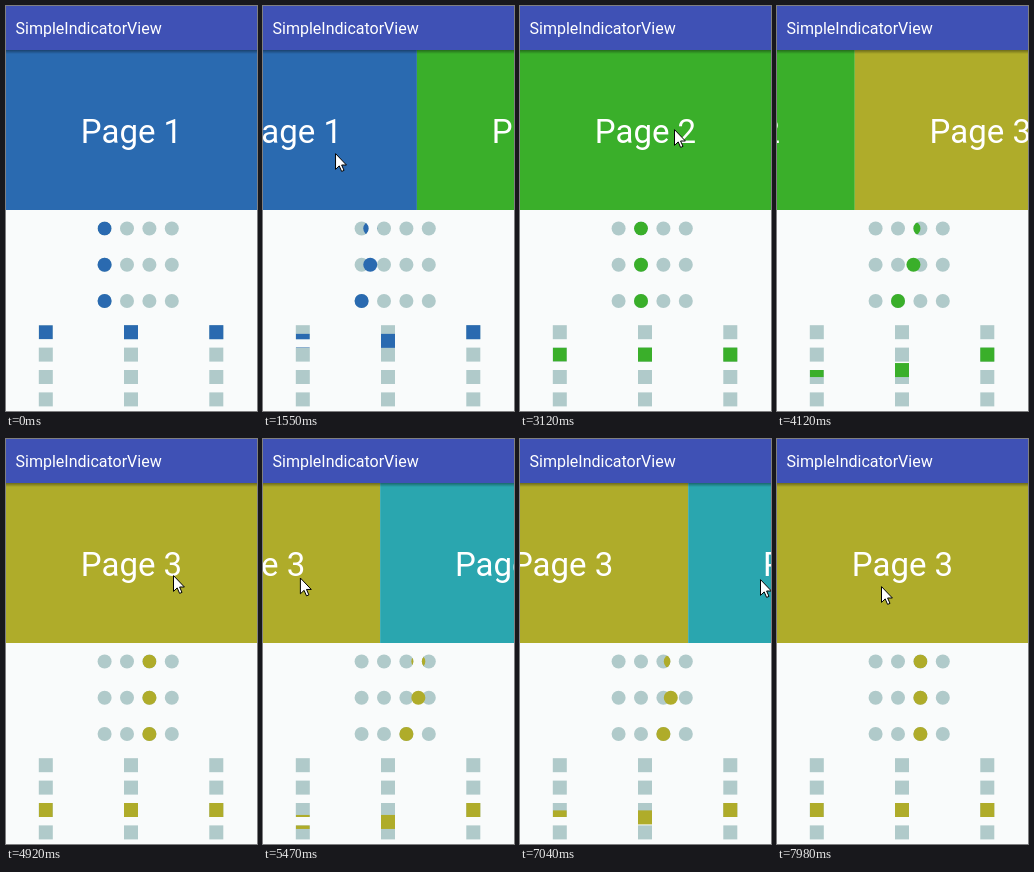
These frames come from a looping animation (251x405 px, 8 s). An HTML page:

```html
<!DOCTYPE html>
<html lang="en">
<head>
<meta charset="utf-8">
<title>Pager indicators</title>
<style>
  html, body { margin: 0; width: 100%; height: 100%; overflow: hidden; background: #f9fbfb; }
  svg { display: block; width: 100vw; height: 100vh; }
  text { font-family: Roboto, "Noto Sans", sans-serif; fill: #fff; }
  .title { font-size: 16px; }
  .page { font-size: 33px; text-anchor: middle; }
  .idle { fill: #b0caca; }
</style>
</head>
<body>
<svg viewBox="0 0 251 405">
  <defs>
    <linearGradient id="shade" x2="0" y2="1">
      <stop offset="0" stop-color="#000" stop-opacity=".38"/>
      <stop offset="1" stop-color="#000" stop-opacity="0"/>
    </linearGradient>
    <clipPath id="dotClip"></clipPath>
    <clipPath id="boxClip"></clipPath>
  </defs>
  <rect width="251" height="405" fill="#f9fbfb"/>
  <g id="pages"></g>
  <rect y="44" width="251" height="4" fill="url(#shade)"/>
  <rect width="251" height="44" fill="#3f51b5"/>
  <text class="title" x="9.5" y="27.5">SimpleIndicatorView</text>
  <g id="idle" class="idle"></g>
  <g id="active"></g>
  <path id="cursor" d="M.5 .6V16.4L4.2 12.9 6.6 18.4 9 17.4 6.6 12H11.4Z"
        fill="#fff" stroke="#000" stroke-width="1"/>
</svg>
<script>
const LOOP = 8000, FIRST = 370, TICK = 78.45;
const WIDTH = 251, GAP = 22.4, COUNT = 4;
const COLORS = ['#2a6ab0', '#3aaf2a', '#afac2a', '#2aa6af'];
const ROWS = [222.5, 258.7, 295];
const COLUMNS = [32.8, 118, 203.3];

const byId = id => document.getElementById(id);

function add(parent, tag, attrs) {
  const el = document.createElementNS('http://www.w3.org/2000/svg', tag);
  for (const key in attrs) el.setAttribute(key, attrs[key]);
  return parent.appendChild(el);
}
const addDot = (parent, cy, i = 0) =>
  add(parent, 'circle', { cx: 98.6 + GAP * i, cy, r: 7 });
const addBox = (parent, x, i = 0) =>
  add(parent, 'rect', { x, y: 319.2 + GAP * i, width: 14, height: 14 });

COLORS.forEach((fill, i) => {
  add(byId('pages'), 'rect', { x: WIDTH * i, y: 44, width: WIDTH, height: 160, fill });
  add(byId('pages'), 'text', { class: 'page', x: WIDTH * (i + .5), y: 136.5 })
    .textContent = 'Page ' + (i + 1);
});
for (let i = 0; i < COUNT; i++) {
  ROWS.forEach(y => addDot(byId('idle'), y, i));
  COLUMNS.forEach(x => addBox(byId('idle'), x, i));
  addDot(byId('dotClip'), ROWS[0], i);
  addBox(byId('boxClip'), COLUMNS[0], i);
}

// The first indicator of each kind shows only inside the idle marks.
function addActive(draw, places, clip) {
  return places.map((place, i) => {
    const holder = add(byId('active'), 'g', i ? {} : { 'clip-path': `url(#${clip})` });
    return draw(holder, place);
  });
}
const dots = addActive(addDot, ROWS, 'dotClip');
const boxes = addActive(addBox, COLUMNS, 'boxClip');

const smooth = x => x * x * (3 - 2 * x);
const settle = x => 1 - (1 - x) ** 4;

// Moves: start tick, end tick, target values, easing
const SCROLL = [
  [11, 18.6, [.717]], [26, 30, [1], settle],
  [41, 46, [1.69]], [47, 48, [1.673]], [48, 52, [2], settle],
  [63, 66, [2.72]], [68, 72, [3], settle],
  [81, 85, [2.33]], [87, 91, [2], settle]
];
const POINTER = [
  [-1, 0, [198, 348]], [0, 6, [181, 147]], [11, 18.6, [-21, 147]],
  [30, 35, [154, 123]], [35, 37, [174, 123]], [38, 39, [178, 124]], [41, 46, [-16, 130]],
  [52, 58, [167, 136]], [58, 62, [188, 134]], [63, 66, [-16, 140]],
  [74, 75, [70, 137]], [75, 76, [87, 137]], [77, 80, [69, 140]], [81, 85, [240, 140]],
  [91, 94, [60, 147]], [96, 97, [104, 147]]
];

function follow(moves, from, tick) {
  let at = from;
  for (const [start, end, to, ease = smooth] of moves) {
    if (tick <= start) break;
    if (tick >= end) { at = to; continue; }
    const k = ease((tick - start) / (end - start));
    return at.map((v, i) => v + (to[i] - v) * k);
  }
  return at;
}

function draw(time) {
  const tick = Math.max(-1, Math.floor((time - FIRST + 8) / TICK));
  const [pos] = follow(SCROLL, [0], tick);
  const [x, y] = follow(POINTER, [198, 420], tick);
  const page = Math.floor(pos);

  byId('pages').setAttribute('transform', `translate(${-pos * WIDTH} 0)`);
  byId('active').setAttribute('fill', COLORS[page]);
  for (let i = 0; i < 3; i++) {
    const shift = GAP * (i === 2 ? page : pos);
    dots[i].setAttribute('cx', 98.6 + shift);
    boxes[i].setAttribute('y', 319.2 + shift);
  }
  byId('cursor').setAttribute('transform', `translate(${x} ${y})`);
}

const begin = performance.now();
function frame() {
  draw((performance.now() - begin) % LOOP);
  requestAnimationFrame(frame);
}
frame();
</script>
</body>
</html>
```
